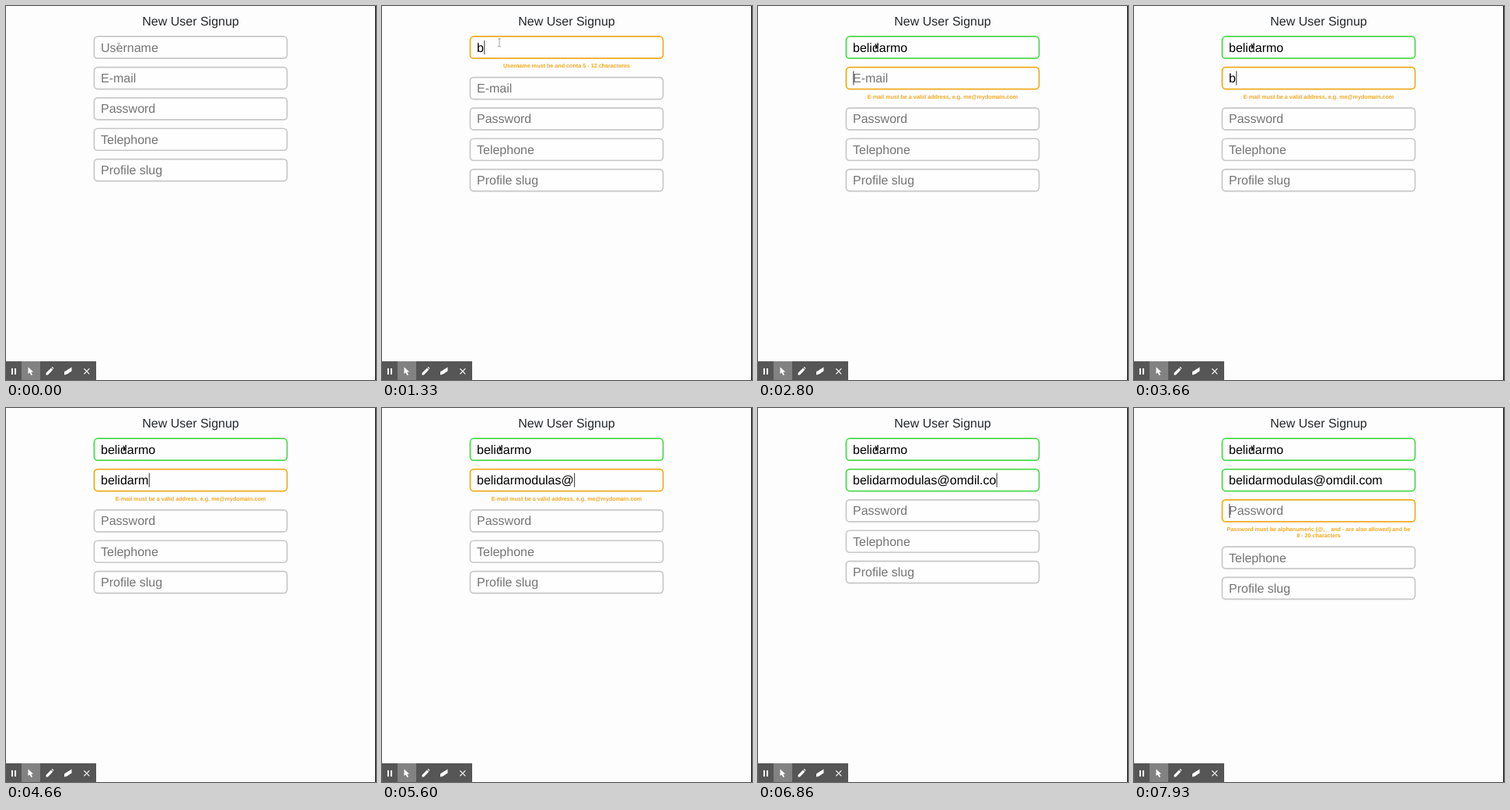
Write an HTML page that moves like this. It is 476x480 px and loops after 8 s.

```html
<!DOCTYPE html>
<html lang="en">
<head>
<meta charset="utf-8">
<title>New User Signup</title>
<style>
  html, body { margin: 0; width: 100%; height: 100%; overflow: hidden; background: #fdfdfd; }
  svg { display: block; width: 476px; height: 480px; }
  text { font: 16px "Liberation Sans", Arial, sans-serif; text-rendering: geometricPrecision; white-space: pre; }
  .title { fill: #25282c; text-anchor: middle; }
  .box { fill: #fefefe; stroke-width: 1.7; }
  .warning { font-size: 7.2px; font-weight: bold; fill: #f2a81d; text-anchor: middle; }
</style>
</head>
<body>
<svg viewBox="0 0 476 480">
  <rect width="476" height="480" fill="#fdfdfd"/>
  <text class="title" x="237.5" y="24.6">New User Signup</text>
  <g id="form"></g>
  <rect id="caret" width="1" height="18" fill="#333"/>
  <g id="beam" fill="none" stroke="#999" stroke-width=".9">
    <path d="M-2-5H2M0-5V5M-2 5H2" stroke="#fff" stroke-width="2" opacity=".6"/>
    <path d="M-2-5H2M0-5V5M-2 5H2"/>
  </g>
  <path id="arrow" d="M150.6 47.2V56L152.4 54.4 153.7 57 155 56.4 153.9 53.8H156Z"
        fill="#111" stroke="#fff" stroke-width=".5"/>

  <rect y="456" width="116" height="24" fill="#565656"/>
  <rect x="20" y="456" width="24" height="24" fill="#828282"/>
  <g fill="#fff">
    <path d="M7 465h2v8H7zM11 465h2v8h-2z"/>
    <path d="M28.5 463.5V472.3L30.6 470.5 32.4 474 34 473.2 32.4 469.8H35.2Z"/>
    <path d="M51.5 473.5V471L58 464.5 60.3 466.8 53.8 473.5ZM58.7 463.8 59.6 463 61.5 464.9 60.8 466Z"/>
    <path d="M75 473.5V469.5L84.5 463.5V468.5L78.5 472.5Z"/>
  </g>
  <path d="M100.3 465.3 107.3 472.3M107.3 465.3 100.3 472.3" stroke="#fff" stroke-width="1.2"/>
  <rect x="475" width="1" height="480" fill="#000"/>
</svg>
<script>
const LOOP = 8000, PITCH = 39.35, FIRST_ROW = 53.2, TEXT_X = 122;
const GRAY = '#c8c8c8', ORANGE = '#eeab22', GREEN = '#4fd84f';
const byId = id => document.getElementById(id);

function add(parent, tag, attrs, content = '') {
  const node = document.createElementNS('http://www.w3.org/2000/svg', tag);
  for (const name in attrs) node.setAttribute(name, attrs[name]);
  node.textContent = content;
  return parent.appendChild(node);
}

const evenKeys = (start, step, count) => Array.from({ length: count }, (_, i) => start + i * step);

const fields = [
  { label: 'Username', focusAt: 1200, value: 'belidarmo',
    keys: [1330, 1460, 1600, 1800, 1860, 1930, 2060, 2200, 2330],
    valid: s => s.length >= 5, shift: 13,
    hint: ['Username must be and conta 5 - 12 characteres'] },
  { label: 'E-mail', focusAt: 2530, value: 'belidarmodulas@omdil.com',
    keys: [...evenKeys(3600, 138, 15), 5800, 5930, 6060, 6200, 6330, 6530, 6660, 6860, 7000],
    valid: s => /\.\w{2,}$/.test(s), shift: 13,
    hint: ['E-mail must be a valid address, e.g. me@mydomain.com'] },
  { label: 'Password', focusAt: 7600, value: '', keys: [],
    valid: () => false, shift: 20.8,
    hint: ['Password must be alphanumeric (@, _ and - are also allowed) and be', '8 - 20 characters'] },
  { label: 'Telephone' },
  { label: 'Profile slug' }
];

for (const field of fields) {
  field.group = add(byId('form'), 'g', {});
  field.box = add(field.group, 'rect', { class: 'box', x: 113.4, y: -14, width: 248.2, height: 28, rx: 4.5 });
  field.text = add(field.group, 'text', { x: TEXT_X, y: 5.5 });
  field.warning = add(field.group, 'g', {});
  (field.hint || []).forEach((line, i) =>
    add(field.warning, 'text', { class: 'warning', x: 237.5, y: 26.2 + 8 * i }, line));
}

const show = (node, on) => node.setAttribute('visibility', on ? 'visible' : 'hidden');

function drawCaret(field, typed, y, t) {
  const lastInput = typed.length ? field.keys[typed.length - 1] : field.focusAt;
  const width = typed ? field.text.getComputedTextLength() : 0;
  byId('caret').setAttribute('x', TEXT_X + width + 0.4);
  byId('caret').setAttribute('y', y - 9);
  show(byId('caret'), (t - lastInput) % 1000 < 500);
}

function drawPointer(t) {
  const p = Math.min(1, Math.max(0, (t - 60) / 600));
  const eased = p * p * (3 - 2 * p);
  byId('beam').setAttribute('transform', `translate(${145 + 6 * eased} ${53 - 6 * eased})`);
  const typingName = t < fields[1].focusAt;
  show(byId('beam'), typingName);
  show(byId('arrow'), !typingName);
}

function draw(t) {
  const active = fields.filter(f => t >= f.focusAt).pop();
  let y = FIRST_ROW;
  show(byId('caret'), false);
  for (const field of fields) {
    const touched = t >= field.focusAt;
    const typed = touched ? field.value.slice(0, field.keys.filter(k => k <= t).length) : '';
    const invalid = touched && !field.valid(typed);
    field.group.setAttribute('transform', `translate(0 ${y})`);
    field.box.setAttribute('stroke', invalid ? ORANGE : touched ? GREEN : GRAY);
    field.text.textContent = typed || field.label;
    field.text.setAttribute('fill', typed ? '#000' : '#757575');
    show(field.warning, invalid);
    if (field === active) drawCaret(field, typed, y, t);
    y += PITCH + (invalid ? field.shift : 0);
  }
  drawPointer(t);
}

const start = performance.now();
function tick() {
  draw((performance.now() - start) % LOOP);
  requestAnimationFrame(tick);
}
tick();
</script>
</body>
</html>
```
